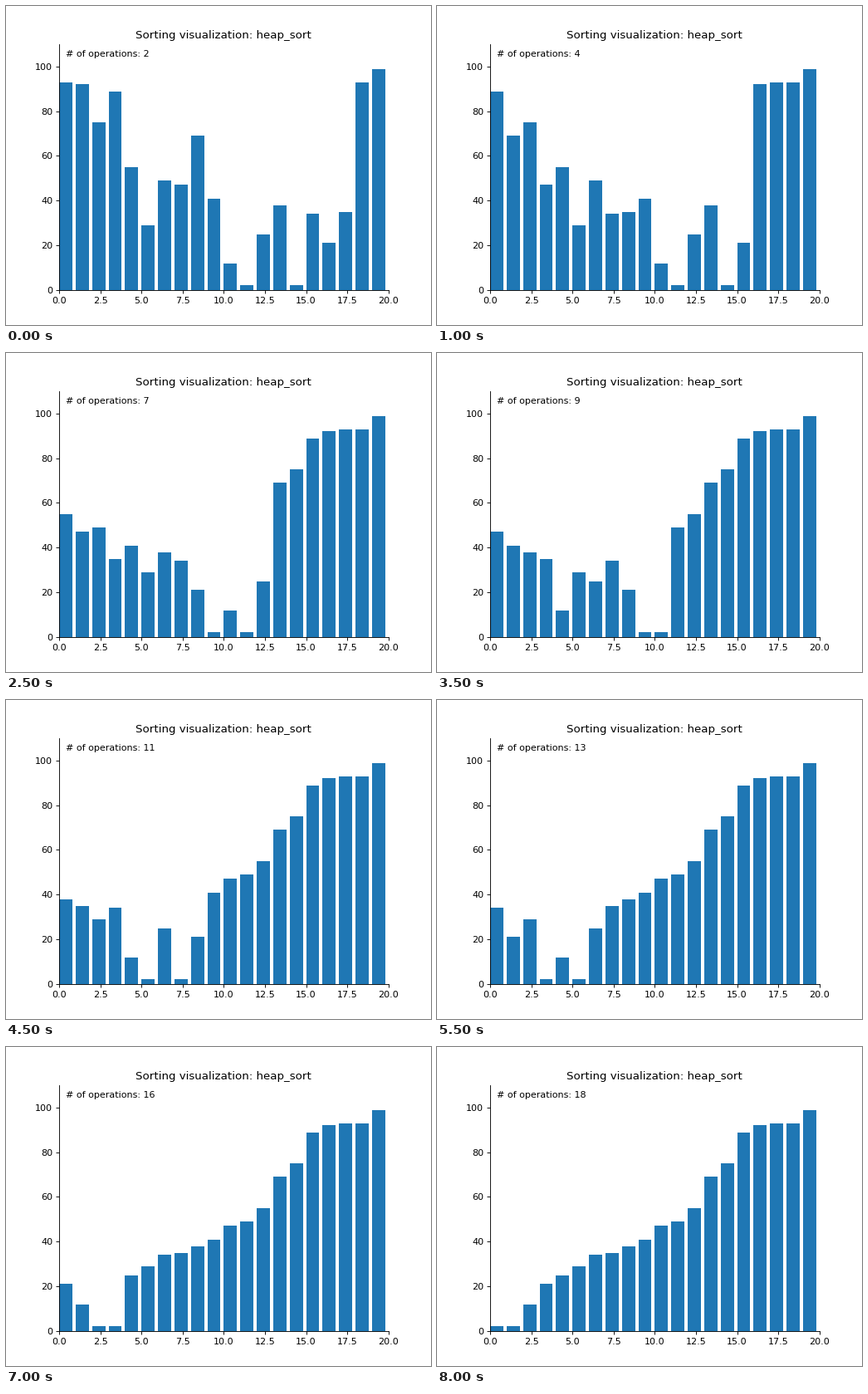
A matplotlib script for the animation above (8.5 s loop, 512x384 px).

```python
import matplotlib.pyplot as plt
from matplotlib.animation import FuncAnimation

HEAP = [93, 92, 75, 89, 55, 29, 49, 47, 69, 41,
        12, 2, 25, 38, 2, 34, 21, 35]
SORTED_TAIL = [93, 99]
STEPS = 17
INTERVAL = 500


def sift_down(a, size):
    """Restore the max-heap property of a[:size] from the root."""
    root = 0
    while (child := 2 * root + 1) < size:
        if child + 1 < size and a[child + 1] > a[child]:
            child += 1
        if a[child] <= a[root]:
            break
        a[root], a[child] = a[child], a[root]
        root = child


def heap_sort_states():
    """Return the array after each extraction of the maximum."""
    a = HEAP + SORTED_TAIL
    states = [a.copy()]
    for end in range(len(HEAP) - 1, len(HEAP) - STEPS, -1):
        a[0], a[end] = a[end], a[0]
        sift_down(a, end)
        states.append(a.copy())
    return states


states = heap_sort_states()
count = len(states[0])

plt.rcParams["font.family"] = "DejaVu Sans"
fig, ax = plt.subplots(figsize=(6.4, 4.8), dpi=80)
ax.set_title("Sorting visualization: heap_sort")
bars = ax.bar(range(count), states[0], width=0.8, align="edge", color="#1f77b4")
ax.set_xlim(0, count)
ax.set_ylim(0, 110)
ax.spines[["top", "right"]].set_visible(False)
label = ax.text(0.02, 0.95, "", transform=ax.transAxes)


def update(step):
    for bar, value in zip(bars, states[step]):
        bar.set_height(value)
    label.set_text(f"# of operations: {step + len(SORTED_TAIL)}")
    return [*bars, label]


anim = FuncAnimation(fig, update, frames=STEPS, interval=INTERVAL,
                     init_func=lambda: update(0), repeat=True, repeat_delay=0)
plt.show()
```
